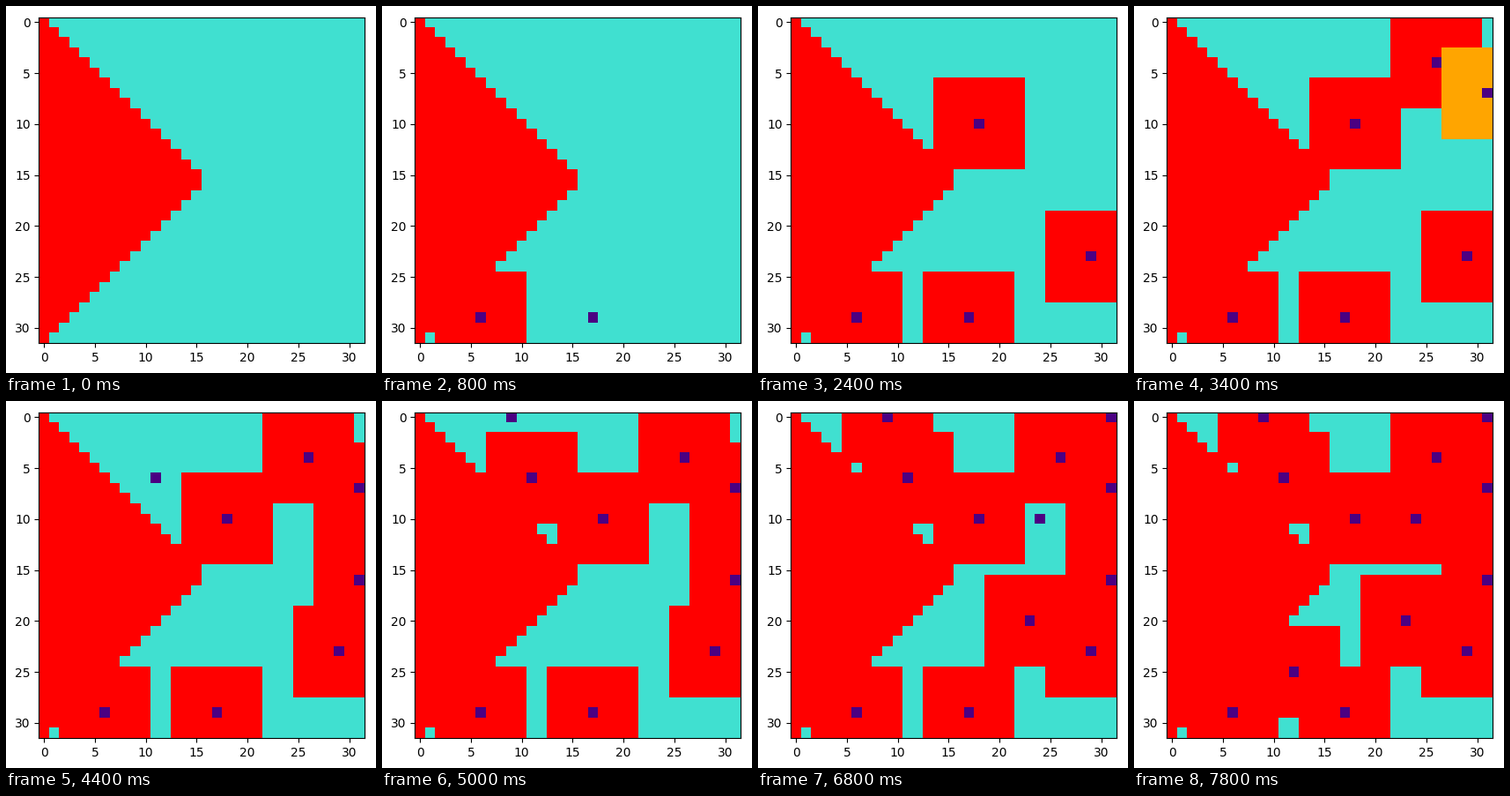
A matplotlib script for the animation above (8000 ms loop, 420 by 416 pixels).

```python
import numpy as np
import matplotlib.pyplot as plt
from matplotlib.animation import FuncAnimation

W, H, DPI = 420, 416, 100
N = 32          # grid cells per side
REACH = 4       # half width of the block closed around each point
SIDE = 369.6    # axes side in pixels
LEFT, BOTTOM = 37.39, 33.72

TURQUOISE = (64, 224, 208)
RED = (255, 0, 0)
ORANGE = (255, 165, 0)
INDIGO = (75, 0, 130)

# Sample points (column, row) in the order they are drawn
POINTS = [(6, 29), (17, 29), (29, 23), (18, 10), (26, 4), (31, 7), (31, 16),
          (11, 6), (9, 0), (31, 0), (23, 20), (24, 10), (12, 25)]
STAGES = 3      # point, orange block, red block
FRAMES = 1 + STAGES * len(POINTS)


def start_grid():
    row, col = np.indices((N, N))
    grid = np.full((N, N, 3), TURQUOISE, dtype=np.uint8)
    grid[col <= np.minimum(row, N - 1 - row)] = RED
    return grid


def fill_block(grid, point, color):
    x, y = point
    grid[max(y - REACH, 0):y + REACH + 1,
         max(x - REACH, 0):x + REACH + 1] = color
    grid[y, x] = INDIGO


def grid_at(frame):
    grid = start_grid()
    for step in range(frame):
        k, stage = divmod(step, STAGES)
        x, y = POINTS[k]
        if stage == 0:
            grid[y, x] = INDIGO
        else:
            fill_block(grid, (x, y), ORANGE if stage == 1 else RED)
    return grid


fig = plt.figure(figsize=(W / DPI, H / DPI), dpi=DPI, facecolor="white")
ax = fig.add_axes([LEFT / W, BOTTOM / H, SIDE / W, SIDE / H])
image = ax.imshow(start_grid(), interpolation="nearest")
ax.set_xticks(range(0, N, 5))
ax.set_yticks(range(0, N, 5))


def update(frame):
    image.set_data(grid_at(frame))
    return [image]


anim = FuncAnimation(fig, update, frames=FRAMES, interval=200,
                     repeat=True, repeat_delay=0, blit=False)
plt.show()
```
